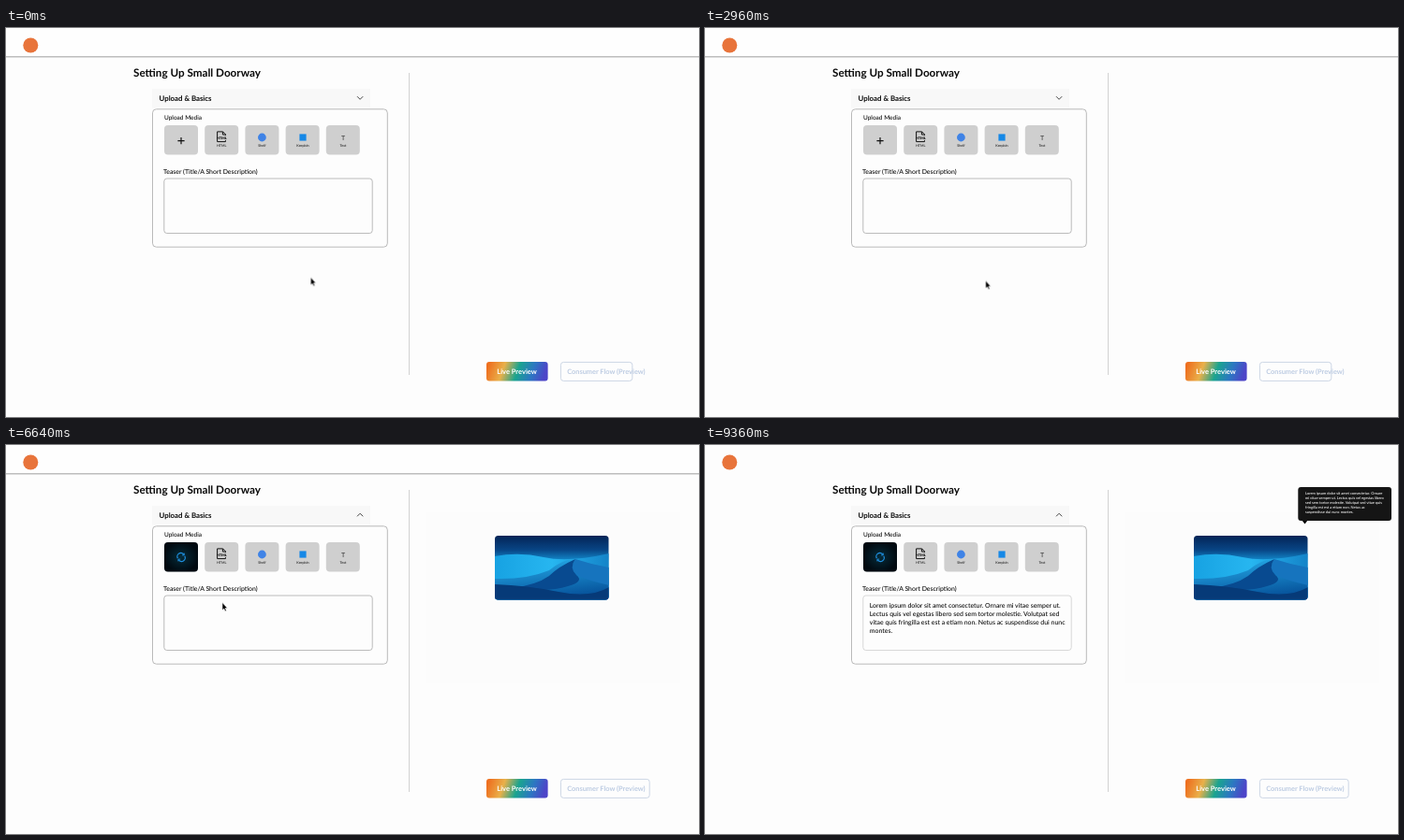
Recreate the animation shown at these times as an HTML page. Size 740 by 416 pixels, loop 9.44 s.

```html
<!DOCTYPE html>
<html lang="en">
<head>
<meta charset="utf-8">
<title>Gateway setup</title>
<style>
html, body { margin: 0; width: 100%; height: 100%; overflow: hidden; background: #fdfdfd; }
svg { display: block; width: 100vw; height: 100vh; font-family: Lato, Carlito, sans-serif; fill: #0a0a0a; text-rendering: geometricPrecision; }
.bold { font-weight: 700; }
.label { font-size: 3.7px; text-anchor: middle; }
.body { font-size: 6.92px; font-weight: 500; }
.tip { font-size: 3.95px; font-weight: 500; fill: #fff; }
.button { font-size: 7.4px; font-weight: 700; }
.ghost { fill: #bccbe2; }
.outline { fill: none; stroke: #ccd6e5; }

/* One shared clock; every state is a hard switch */
.empty, .loaded, .video, .audio, .dunes, .blank, .filled, .early, .full, .wide, .final, .mouse {
  animation: 9.44s step-end infinite;
}
.empty { animation-name: empty; }
.loaded { animation-name: loaded; }
.video { animation-name: video; }
.audio { animation-name: audio; }
.dunes { animation-name: dunes; }
.blank { animation-name: blank; }
.filled { animation-name: filled; }
.early { animation-name: early; }
.full { animation-name: full; }
.wide { animation-name: wide; }
.final { animation-name: final; }
.mouse { animation-name: mouse; }
.path { animation: path 9.44s ease-in-out infinite; }

@keyframes empty {
  0%, 27.97%, 55.08% { visibility: visible; }
  10.17%, 38.14%, 66.1%, 100% { visibility: hidden; }
}
@keyframes loaded {
  0%, 27.97%, 55.08% { visibility: hidden; }
  10.17%, 38.14%, 66.1%, 100% { visibility: visible; }
}
@keyframes video {
  0%, 27.97%, 100% { visibility: hidden; }
  10.17% { visibility: visible; }
}
@keyframes audio {
  0%, 55.08%, 100% { visibility: hidden; }
  38.14% { visibility: visible; }
}
@keyframes dunes {
  0% { visibility: hidden; }
  66.1%, 100% { visibility: visible; }
}
@keyframes blank {
  0%, 27.97%, 55.08% { visibility: visible; }
  16.95%, 48.31%, 72.88%, 100% { visibility: hidden; }
}
@keyframes filled {
  0%, 27.97%, 55.08% { visibility: hidden; }
  16.95%, 48.31%, 72.88%, 100% { visibility: visible; }
}
@keyframes early {
  0%, 27.97% { visibility: visible; }
  16.95%, 48.31%, 100% { visibility: hidden; }
}
@keyframes full {
  0%, 27.97%, 55.08%, 100% { visibility: hidden; }
  16.95%, 48.31% { visibility: visible; }
}
@keyframes wide {
  0% { visibility: hidden; }
  55.08%, 100% { visibility: visible; }
}
@keyframes final {
  0% { visibility: hidden; }
  72.88%, 100% { visibility: visible; }
}
@keyframes mouse {
  0% { visibility: visible; }
  88.98%, 100% { visibility: hidden; }
}
@keyframes path {
  0% { transform: translate(325.4px, 267.2px); }
  1.69%, 3.39% { transform: translate(325.4px, 268px); }
  9.32%, 10.59% { transform: translate(187px, 123px); }
  13.77%, 14.41% { transform: translate(231px, 169px); }
  15.25% { transform: translate(241.8px, 180.3px); animation-timing-function: ease-out; }
  22.88% { transform: translate(297.8px, 251.8px); }
  25.42%, 30.72% { transform: translate(302px, 273.8px); }
  37.08%, 38.56% { transform: translate(187px, 123px); }
  44.07%, 46.61% { transform: translate(230.8px, 168.8px); }
  52.97%, 57.63% { transform: translate(302px, 273.8px); }
  58.47% { transform: translate(295.8px, 269.8px); animation-timing-function: ease-out; }
  63.98%, 66.53% { transform: translate(187px, 123px); }
  69.92%, 72.03% { transform: translate(231px, 169px); }
  78.39%, 100% { transform: translate(302px, 273.8px); }
}
</style>
</head>
<body>
<svg viewBox="0 0 740 416" preserveAspectRatio="none">
  <defs>
    <linearGradient id="rainbow" gradientUnits="userSpaceOnUse" x1="516" y1="357" x2="576" y2="378">
      <stop offset="0" stop-color="#ee6f1f"/>
      <stop offset=".26" stop-color="#e9b04a"/>
      <stop offset=".5" stop-color="#1aa48f"/>
      <stop offset=".74" stop-color="#2c77c2"/>
      <stop offset=".95" stop-color="#4d45c8"/>
    </linearGradient>
    <radialGradient id="dusk" gradientUnits="userSpaceOnUse" cx="598" cy="127" r="78">
      <stop offset="0" stop-color="#ffe27a"/>
      <stop offset=".15" stop-color="#ffb02e"/>
      <stop offset=".5" stop-color="#ee7413"/>
      <stop offset="1" stop-color="#c2440c"/>
    </radialGradient>
    <linearGradient id="sand" x2="0" y2="1">
      <stop offset="0" stop-color="#a34e10"/>
      <stop offset="1" stop-color="#6f2c06"/>
    </linearGradient>
    <linearGradient id="night" x2="0" y2="1">
      <stop offset="0" stop-color="#042456"/>
      <stop offset=".22" stop-color="#084585"/>
      <stop offset=".4" stop-color="#1490d2"/>
    </linearGradient>
    <linearGradient id="back">
      <stop offset="0" stop-color="#17a2e2"/>
      <stop offset=".5" stop-color="#27b6f0"/>
      <stop offset="1" stop-color="#1483c8"/>
    </linearGradient>
    <linearGradient id="slope" x2=".3" y2="1">
      <stop offset="0" stop-color="#27b2ee"/>
      <stop offset="1" stop-color="#07549c"/>
    </linearGradient>
    <radialGradient id="deep">
      <stop offset="0" stop-color="#062c3a"/>
      <stop offset="1" stop-color="#010a11"/>
    </radialGradient>
    <clipPath id="screen"><rect x="522" y="97" width="121.5" height="68.5" rx="3.5"/></clipPath>
    <g id="teaser" class="tip">
      <text>Lorem ipsum dolor sit amet consectetur. Ornare</text>
      <text y="4.9">mi vitae semper ut. Lectus quis vel egestas libero</text>
      <text y="9.8">sed sem tortor molestie. Volutpat sed vitae quis</text>
      <text y="14.7">fringilla est est a etiam non. Netus ac</text>
      <text y="19.6">suspendisse dui nunc montes.</text>
    </g>
    <g id="skip" fill="none" stroke="#111">
      <path d="M-2.6 -4.2A5 5 0 1 0 2.6 -4.2"/>
      <path d="M-3.6 -4.8H2.8M1 -6.4L3 -4.8L1 -3.2" stroke-width=".9"/>
    </g>
  </defs>

  <rect width="740" height="416" fill="#fdfdfd"/>
  <g class="blank">
    <rect width="740" height="30" fill="#fefefe"/>
    <path d="M0 30.8H740" stroke="#bdbdbd" stroke-width="1.4"/>
  </g>
  <circle cx="26.3" cy="18.5" r="8" fill="#e8743b"/>
  <path d="M430.5 48V371" stroke="#d2d2d2"/>

  <!-- Form -->
  <text class="bold" x="136" y="52.4" font-size="11.7">Setting Up Small Doorway</text>
  <rect x="156" y="65" width="233" height="20.5" fill="#f8f8f8"/>
  <text class="bold" x="163.6" y="77.6" font-size="7.8">Upload &amp; Basics</text>
  <g fill="none" stroke="#333" stroke-width=".9">
    <path class="empty" d="M375 73.2L378.1 76.3L381.2 73.2"/>
    <path class="loaded" d="M375 76.3L378.1 73.2L381.2 76.3"/>
    <rect x="156.5" y="86.8" width="250.8" height="147.4" rx="4" stroke="#bababa" stroke-width="1"/>
    <rect class="blank" x="168.8" y="161" width="222.4" height="58.5" rx="3" stroke="#b4b4b4"/>
    <rect class="filled" x="168.8" y="161" width="222.4" height="58.5" rx="3" stroke="#d4d4d4"/>
  </g>
  <g font-weight="500">
    <text x="169" y="98" font-size="6.5">Upload Media</text>
    <text x="168" y="155.6" font-size="6.9">Teaser (Title/A Short Description)</text>
  </g>

  <g fill="#cfcfcf">
    <rect x="169" y="104" width="36" height="31.5" rx="4"/>
    <rect x="212.2" y="104" width="36" height="31.5" rx="4"/>
    <rect x="255.4" y="104" width="36" height="31.5" rx="4"/>
    <rect x="298.6" y="104" width="36" height="31.5" rx="4"/>
    <rect x="341.8" y="104" width="36" height="31.5" rx="4"/>
  </g>
  <path class="empty" d="M183.4 120.6H190.6M187 117V124.2" stroke="#111" stroke-width="1.2"/>
  <g class="loaded">
    <rect x="169" y="104" width="36" height="31.5" rx="4" fill="url(#deep)"/>
    <g fill="none" stroke="#1f8fe0" stroke-width="1.3">
      <path d="M183.4 121.2A3.8 3.8 0 0 1 190 117.4M190.8 118.8A3.8 3.8 0 0 1 184.2 122.6"/>
      <path d="M190.3 115.6V117.9H188M183.9 124.4V122.1H186.2" stroke-width=".9"/>
    </g>
  </g>
  <path d="M225.6 121.6V110.9H231.6L234.4 113.7V115M231.4 111V114H234.2M225.6 121.6H234.4V120" fill="none" stroke="#111"/>
  <text class="label" font-weight="900" x="230.4" y="119.2">HTML</text>
  <circle cx="273.4" cy="117" r="4.4" fill="#3f83e6"/>
  <rect x="313.4" y="113.4" width="7.2" height="7.2" fill="#1688e6"/>
  <text x="360" y="119.6" font-size="7" text-anchor="middle" fill="#333">T</text>
  <g class="label">
    <text x="230.2" y="127.2">HTML</text>
    <text x="273.4" y="127.2">Shelf</text>
    <text x="317" y="127.2">Keepbin</text>
    <text x="360" y="127.2">Text</text>
  </g>
  <g class="filled body">
    <text x="175.8" y="174">Lorem ipsum dolor sit amet consectetur. Ornare mi vitae semper ut.</text>
    <text x="175.8" y="182.9">Lectus quis vel egestas libero sed sem tortor molestie. Volutpat sed</text>
    <text x="175.8" y="191.7">vitae quis fringilla est est a etiam non. Netus ac suspendisse dui nunc</text>
    <text x="175.8" y="200.5">montes.</text>
  </g>

  <!-- Video preview -->
  <g class="video">
    <rect x="448" y="72" width="272" height="168" fill="#fcfcfc"/>
    <rect x="461" y="81.5" width="235.5" height="104" fill="#f8f8f8"/>
    <g clip-path="url(#screen)">
      <rect x="522" y="97" width="122" height="69" fill="url(#dusk)"/>
      <circle cx="598" cy="126.5" r="5" fill="#fff3b0"/>
      <path d="M522 133Q545 127 566 131T612 131T644 128V166H522Z" fill="url(#sand)"/>
      <path d="M522 146Q548 133 566 137Q585 141 604 133Q598 141 612 146Q580 145 560 154Q545 148 522 152Z" fill="#c96a1b"/>
      <path d="M604 133Q624 135 644 143V158Q624 146 612 146Q598 141 604 133Z" fill="#5a2205"/>
      <path d="M522 156Q560 144 600 152T644 158V166H522Z" fill="#843708"/>
    </g>
    <circle cx="528.2" cy="159.8" r="1.3" fill="#fff"/>
    <path d="M531.5 159.8H636.5" stroke="#f3d3ba" stroke-width="1.5"/>
  </g>

  <!-- Audio preview -->
  <g class="audio">
    <rect x="448" y="72" width="272" height="168" fill="#fcfcfc"/>
    <rect x="461" y="81.5" width="235.5" height="104" fill="#f8f8f8"/>
    <path id="wave" stroke="#666" stroke-width="1.6" stroke-linecap="round"/>
    <circle cx="581.2" cy="140.5" r="9.8" fill="#000"/>
    <path d="M578.6 135.8L585.6 140.5L578.6 145.2Z" fill="#fff"/>
    <use href="#skip" transform="translate(557 142.4) scale(-1 1)"/>
    <use href="#skip" x="608.6" y="142.4"/>
    <g class="bold" font-size="5.6" text-anchor="middle">
      <text x="557" y="144.4">10</text>
      <text x="608.6" y="144.4">10</text>
    </g>
  </g>

  <!-- Picture preview -->
  <g class="dunes">
    <rect x="448" y="72" width="272" height="183" fill="#fcfcfc"/>
    <g clip-path="url(#screen)">
      <rect x="522" y="97" width="122" height="69" fill="url(#night)"/>
      <path d="M522 119Q548 114 574 120T644 116V166H522Z" fill="url(#back)"/>
      <path d="M522 143Q556 144 580 134Q596 121 608 122Q626 128 644 131V166H522Z" fill="url(#slope)"/>
      <path d="M608 122Q626 128 644 131V150Q622 145 609 139Q601 131 608 122Z" fill="#1674be"/>
      <path d="M608 122Q590 130 580 140Q566 150 540 153Q580 158 600 151Q618 146 609 139Q601 131 608 122Z" fill="#084a90"/>
      <path d="M522 149Q556 150 590 157T644 152V166H522Z" fill="#063a78"/>
    </g>
  </g>

  <!-- Teaser bubbles -->
  <g class="full">
    <path d="M628.5 119L632 123.4L635.5 119Z"/>
    <rect x="625" y="84" width="94.6" height="36" rx="2.5" fill="#151515"/>
    <use href="#teaser" x="632.4" y="92.2"/>
  </g>
  <g class="final">
    <path d="M637 80L640.5 84.6L644 80Z"/>
    <rect x="633.3" y="45" width="99.7" height="36" rx="3" fill="#151515"/>
    <use href="#teaser" x="641" y="53.2"/>
  </g>

  <!-- Buttons -->
  <rect x="513" y="357" width="65.6" height="20.6" rx="3" fill="url(#rainbow)"/>
  <g class="button">
    <text x="524.3" y="369.9" fill="#fff" font-size="7.5">Live Preview</text>
    <g class="early">
      <rect class="outline" x="592.4" y="357.4" width="76.4" height="20" rx="3"/>
      <text class="ghost" x="599.2" y="369.9">Consumer Flow (Preview)</text>
    </g>
    <g class="full">
      <rect class="outline" x="592.4" y="357.4" width="76.4" height="20" rx="3"/>
      <text x="599.2" y="369.9" fill="#cbd0da">Full Flow (Preview)</text>
    </g>
    <g class="wide">
      <rect class="outline" x="592.4" y="357.4" width="94.8" height="20" rx="3"/>
      <text class="ghost" x="599.2" y="369.9">Consumer Flow (Preview)</text>
    </g>
  </g>

  <g class="path">
    <path class="mouse" d="M0 -.4V7.6L1.8 6L3 8.8L4.3 8.2L3.1 5.5H5.4Z" fill="#000" stroke="#fff" stroke-width=".5"/>
  </g>
</svg>
<script>
// Waveform bars, centred on one line
let bars = '';
for (let i = 0; i < 48; i++) {
  const h = 5.5 + 3.6 * Math.sin(i * 1.9) * Math.cos(i * 0.37);
  bars += `M${(513 + i * 2.96).toFixed(2)} ${(107 - h).toFixed(2)}v${(2 * h).toFixed(2)}`;
}
document.getElementById('wave').setAttribute('d', bars);
</script>
</body>
</html>
```
